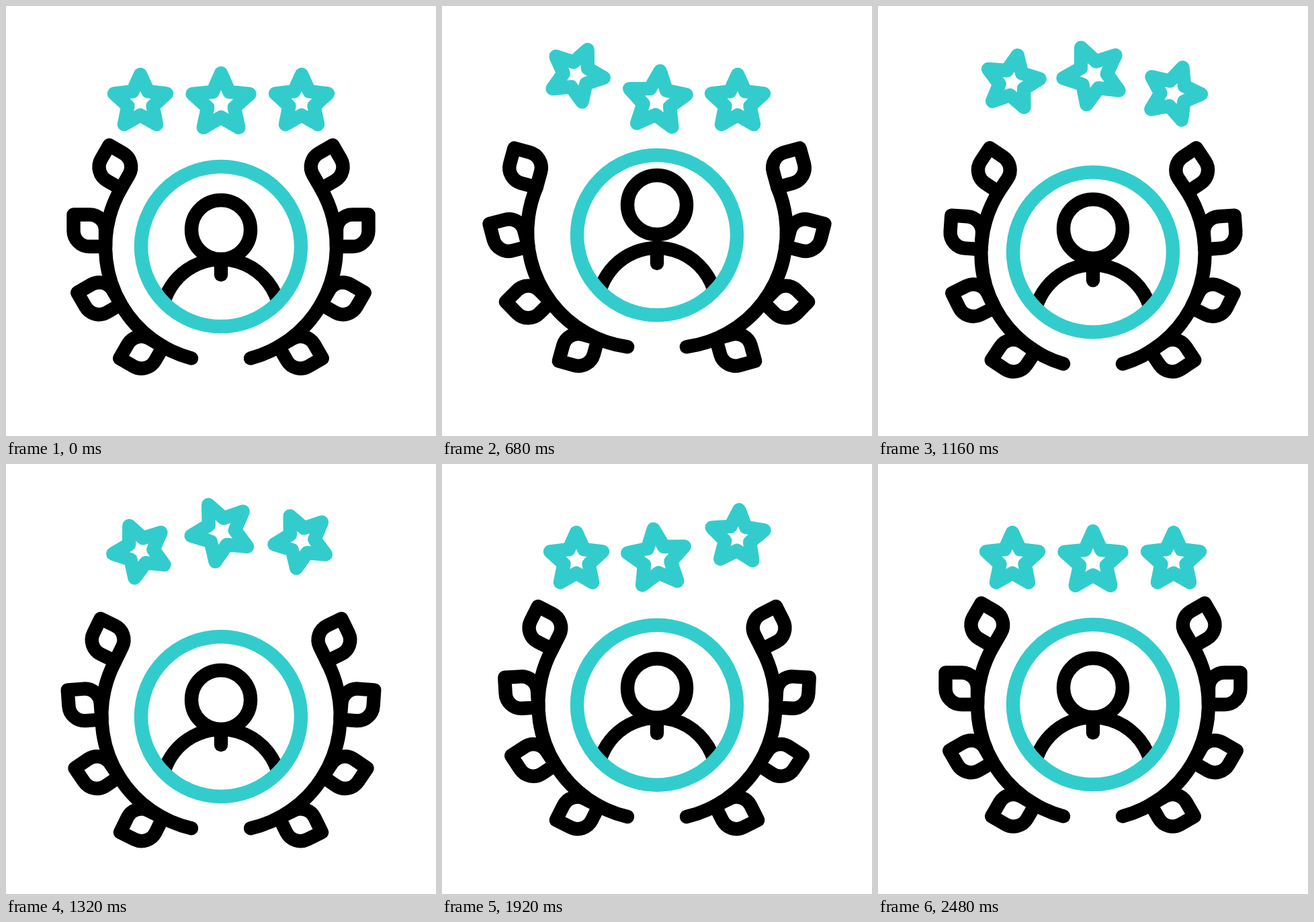
An HTML page with a canvas that plays this animation: 640x640 px, repeating every 2.52 s.

```html
<!DOCTYPE html>
<html>
<head>
<meta charset="utf-8">
<style>
  html, body { margin: 0; height: 100%; overflow: hidden; background: #fff; }
  canvas { display: block; width: 100vw; height: 100vh; }
</style>
</head>
<body>
<canvas id="stage" width="640" height="640"></canvas>
<script>
const ctx = document.getElementById('stage').getContext('2d');
const LOOP = 2520, STEP = 40, TEAL = '#33cccc', BLACK = '#000';
const rad = deg => deg * Math.PI / 180;
const clamp = u => Math.max(0, Math.min(1, u));
const smooth = u => u * u * (3 - 2 * u);
const smoother = u => u * u * u * (u * (6 * u - 15) + 10);

// Keys are [time, value] pairs.
const lift = [[40, 0], [640, -17], [833, -17], [1333, 18], [1620, 18], [1960, 0]];
const nod = [[40, 0], [680, -20], [1000, -21.4], [1300, 0]];
const sway = [[40, 0], [640, -7.5], [1000, 3.6], [1640, -7.5], [2040, 0]];
const stars = [
  { x: 200, y: 143, R: 41, r: 19.5, hop: 43, apex: 840,
    spin: [[40, 0], [680, 96], [1000, 246], [1320, 336], [1630, 360]] },
  { x: 320, y: 144.7, R: 44.7, r: 20.9, hop: 43.5, apex: 1300,
    spin: [[500, 0], [680, 6], [1000, 58.5], [1320, 191], [1640, 312.6], [1920, 353.3], [2100, 358.5], [2360, 360]] },
  { x: 440, y: 143, R: 41, r: 19.5, hop: 43, apex: 1650,
    spin: [[860, 0], [1000, 4], [1320, 47], [1640, 170], [1920, 291], [2200, 349], [2480, 360]] }
];

// Index of the key that opens the span around t.
function spanAt(keys, t) {
  let i = 0;
  while (i < keys.length - 2 && t >= keys[i + 1][0]) i++;
  return i;
}

// Eases in and out of every key.
function eased(keys, t) {
  const i = spanAt(keys, t), [t0, v0] = keys[i], [t1, v1] = keys[i + 1];
  return v0 + (v1 - v0) * smooth(clamp((t - t0) / (t1 - t0)));
}

// Runs smoothly through the keys, at rest at both ends.
function flowing(keys, t) {
  const slope = k => k === 0 || k === keys.length - 1 ? 0
    : (keys[k + 1][1] - keys[k - 1][1]) / (keys[k + 1][0] - keys[k - 1][0]);
  const i = spanAt(keys, t), [t0, v0] = keys[i], [t1, v1] = keys[i + 1];
  const d = t1 - t0, u = clamp((t - t0) / d);
  return v0 + (v1 - v0) * smooth(u)
    + d * u * (1 - u) * ((1 - u) * slope(i) - u * slope(i + 1));
}

function group(draw) {
  ctx.save();
  draw();
  ctx.restore();
}

function stroke(color, trace) {
  ctx.beginPath();
  trace();
  ctx.strokeStyle = color;
  ctx.stroke();
}

function leaf() {
  const s = 47.5, r = 23.5;
  ctx.moveTo(0, 0);
  ctx.arcTo(-s, 0, -s, -s, r);
  ctx.lineTo(-s, -s);
  ctx.arcTo(0, -s, 0, 0, r);
  ctx.closePath();
}

function branch(angle) {
  ctx.translate(276, 524);
  ctx.rotate(rad(angle));
  ctx.translate(44, -166);
  stroke(BLACK, () => ctx.arc(0, 0, 172, rad(104.8), rad(210)));
  for (let k = 0; k < 4; k++) group(() => {
    ctx.rotate(rad(30 - 30 * k));
    ctx.translate(-172, 0);
    ctx.rotate(rad(angle * 1.05));
    stroke(BLACK, leaf);
  });
}

function person(headShift) {
  ctx.lineCap = 'butt';
  stroke(BLACK, () => ctx.arc(320, 465.4, 88.4, rad(196.5), rad(343.5)));
  ctx.lineCap = 'round';
  stroke(BLACK, () => { ctx.moveTo(320, 379); ctx.lineTo(320, 400); });
  stroke(BLACK, () => ctx.arc(320, 333 + headShift, 44, 0, 2 * Math.PI));
  stroke(TEAL, () => ctx.arc(320, 358, 119, 0, 2 * Math.PI));
}

function star({ x, y, R, r, hop, apex, spin }, t) {
  ctx.translate(x, y - hop * smoother(clamp(1 - Math.abs(t - apex) / 800)));
  ctx.rotate(rad(flowing(spin, t)));
  stroke(TEAL, () => {
    for (let k = 0; k < 10; k++) {
      const d = k % 2 ? r : R, a = rad(36 * k);
      ctx.lineTo(d * Math.sin(a), -d * Math.cos(a));
    }
    ctx.closePath();
  });
}

function render(now) {
  const t = Math.floor(now % LOOP / STEP) * STEP;
  ctx.fillStyle = '#fff';
  ctx.fillRect(0, 0, 640, 640);
  ctx.lineWidth = 20.4;
  ctx.lineCap = ctx.lineJoin = 'round';
  group(() => {
    ctx.translate(0, eased(lift, t));
    const angle = eased(sway, t);
    group(() => branch(angle));
    group(() => {
      ctx.transform(-1, 0, 0, 1, 640, 0);
      branch(angle);
    });
    person(eased(nod, t));
  });
  for (const s of stars) group(() => star(s, t));
}

const start = performance.now();
function tick() {
  render(performance.now() - start);
  requestAnimationFrame(tick);
}
tick();
</script>
</body>
</html>
```
